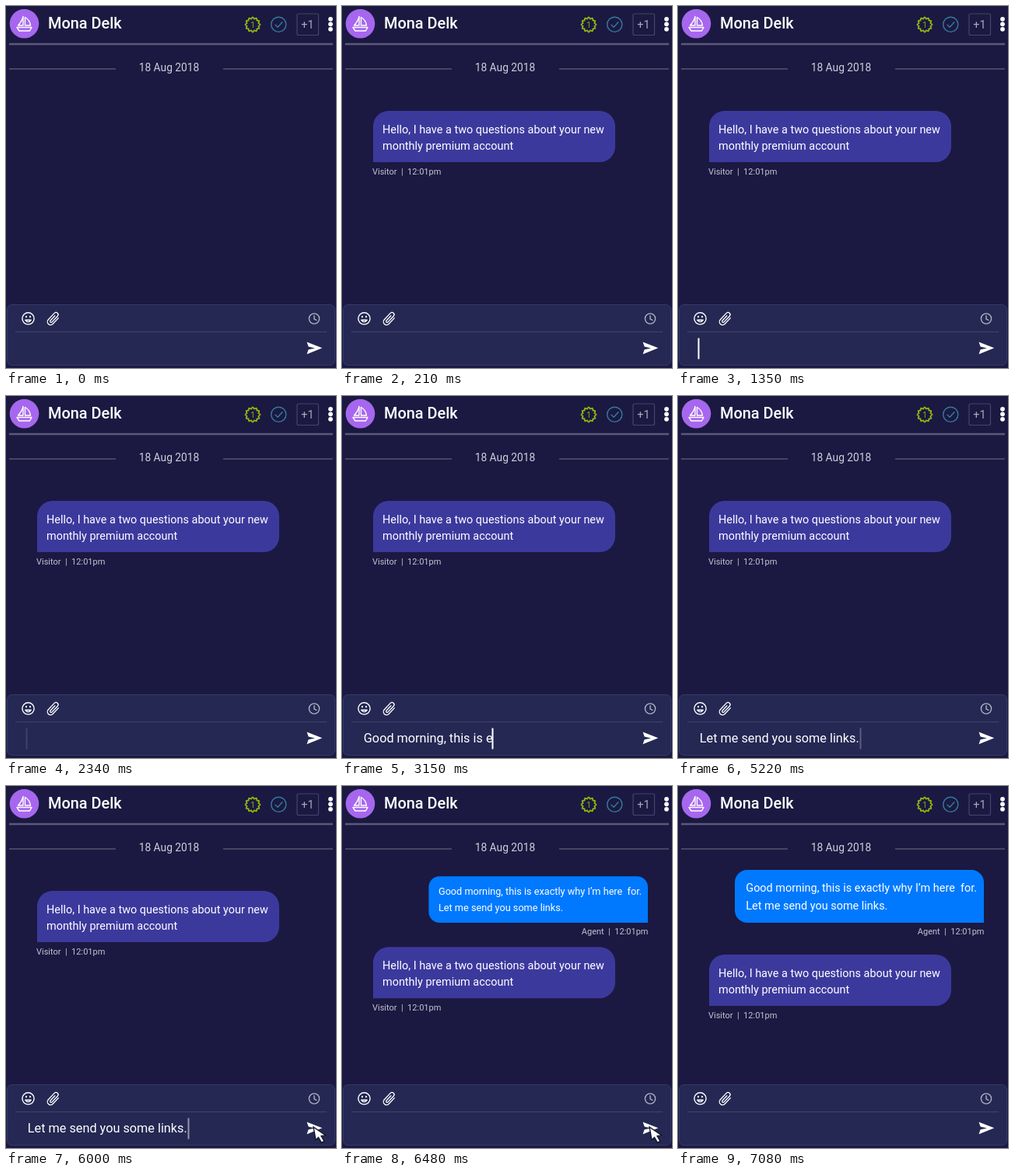
An HTML page for the animation above (8.28 s loop, 424 by 466 pixels).

```html
<!DOCTYPE html>
<html lang="en">
<head>
<meta charset="utf-8">
<title>Chat reply</title>
<style>
  html, body { margin: 0; width: 100%; height: 100%; overflow: hidden; background: #1b1941; }
  svg { display: block; width: 424px; height: 466px; }
  text { font-family: Roboto, Arial, sans-serif; white-space: pre; fill: #fff; }
  .bubble text { font-size: 14.45px; }
  .label { font-size: 11px; fill: #c3c3d2; }
  .line { fill: none; stroke: #fff; stroke-width: 1.4; stroke-linecap: round; stroke-linejoin: round; }
</style>
</head>
<body>
<svg viewBox="0 0 424 466">
  <rect width="424" height="466" fill="#1b1941"/>

  <!-- header -->
  <circle cx="23.5" cy="22.8" r="18.8" fill="#a667ee"/>
  <g class="line" stroke-width="1.3">
    <path d="M14 27.5H33L30.5 32H17ZM22 13.5V25H15.5Q20.5 20 22 13.5ZM24.5 14.5Q30.5 18 31.5 25H24.5Z"/>
  </g>
  <text x="54" y="29.3" font-size="19.9" font-weight="500">Mona Delk</text>
  <path id="badge" class="line" style="stroke:#92b511;stroke-width:1.8"/>
  <text x="317" y="27.8" font-size="10" text-anchor="middle" style="fill:#92b511">1</text>
  <g class="line" style="stroke:#377a9e">
    <circle cx="350.3" cy="23.8" r="9.6"/>
    <path d="M346 24.2L349.2 27.2L355 20.8"/>
  </g>
  <rect x="374" y="10" width="27.5" height="27.5" rx="2" fill="none" stroke="#45446a" stroke-width="1.2"/>
  <text x="387.5" y="28.8" font-size="14.5" text-anchor="middle" style="fill:#a9a9bd">+1</text>
  <g fill="#fff">
    <circle cx="417" cy="16.8" r="2.9"/>
    <circle cx="417" cy="23.3" r="2.9"/>
    <circle cx="417" cy="29.8" r="2.9"/>
  </g>
  <path d="M4 49H420" stroke="#5b5978" stroke-width="2.4"/>
  <path d="M4 81H141M279 81H420" stroke="#55546f" stroke-width="1.5"/>
  <text x="209.5" y="84.2" font-size="13.8" text-anchor="middle" style="fill:#cfcfdb">18 Aug 2018</text>

  <!-- messages -->
  <g id="visitor">
    <g class="bubble">
      <path d="M40 201V155A20 20 0 0 1 60 135H331A20 20 0 0 1 351 155V181A20 20 0 0 1 331 201Z" fill="#3c399d"/>
      <text x="52" y="163.6">Hello, I have a two questions about your new</text>
      <text x="52" y="185">monthly premium account</text>
    </g>
    <text class="label" x="39" y="217">Visitor  |  12:01pm</text>
  </g>
  <g id="agent">
    <g class="bubble">
      <path d="M393 176H89A16 16 0 0 1 73 160V124A16 16 0 0 1 89 108H377A16 16 0 0 1 393 124Z" fill="#0079ff"/>
      <text x="87.3" y="135.6">Good morning, this is exactly why I’m here  for.</text>
      <text x="87.3" y="158.6">Let me send you some links.</text>
    </g>
    <text class="label" x="393.5" y="191" text-anchor="end">Agent  |  12:01pm</text>
  </g>

  <!-- input panel -->
  <rect x="1.5" y="384.5" width="421" height="78" rx="6" fill="#242853" stroke="#353a69"/>
  <path d="M12 419.5H412" stroke="#40446d"/>
  <g class="line">
    <circle cx="28.5" cy="402.3" r="7.6"/>
    <path d="M24.8 404.2Q28.5 409 32.2 404.2Z"/>
    <path d="M26 399.8V400.2M31 399.8V400.2" stroke-width="2"/>
    <path transform="translate(61 402.5) rotate(43)" stroke-width="1.3"
      d="M4 -5V5.5A4 4 0 0 1 -4 5.5V-6A2.8 2.8 0 0 1 1.6 -6V4.5A1.3 1.3 0 0 1 -1.2 4.5V-4"/>
  </g>
  <g class="line" style="stroke:#b0b1c4">
    <circle cx="396" cy="402.5" r="6.6"/>
    <path d="M396 398.6V402.8L398.8 404.4"/>
  </g>
  <path d="M386.5 432.5L406.3 440.3L386.5 448.3L388.6 442.2L397 440.4L388.6 438.6Z" fill="#fff"/>
  <text id="typed" x="27.8" y="445.6" font-size="16.25"></text>
  <rect id="caret" x="-1" y="427.5" width="2" height="27" fill="#fff"/>
  <path id="pointer" d="M0 0L3 16.6L6.4 13.4L10.4 20.2L13.8 18.2L10 11.5L15.6 10.6Z"
    fill="#fff" stroke="#17152f" stroke-width="1.4"/>
</svg>
<script>
const LOOP = 8280, STEP = 30;
const $ = id => document.getElementById(id);
const visitor = $('visitor'), agent = $('agent'), typed = $('typed'), caret = $('caret'), pointer = $('pointer');

// Tables of [time, value], linear in between; a repeated time is a jump.
const pop = [[0, 0], [150, 1.1], [210, 1]];
const caretX = [[2640, 26.5], [3660, 360.5], [3930, 360.5], [3930, 26.5], [4200, 26.5], [4650, 234.5]];
const caretAlpha = [
  [1350, 0], [1350, 1], [1590, 0], [1740, 0], [1980, 1], [2130, 1], [2370, 0],
  [2670, 0], [2670, 1], [3660, 1], [3720, 0], [4050, 0], [4200, 1],
  [5040, 1], [5280, 0], [5430, 0], [5670, 1], [5880, 1], [6000, .5], [6060, 0]
];
const pointerAlpha = [[5310, 0], [5310, 1], [6750, 1], [7080, 0]];
const pointerTravel = [[5280, 0], [5820, 1]];
const pointerScale = [[6180, 1], [6270, .85], [6360, 1]];
const typedAlpha = [[3900, 1], [4200, 0], [4200, 1]];
const lines = [
  { text: 'Good morning, this is exactly why I’m here for.', from: 2640, to: 3660, end: 4200 },
  { text: 'Let me send you some links.', from: 4200, to: 4650, end: 6270 }
];

function at(table, t) {
  const i = table.findLastIndex(p => p[0] <= t);
  if (i < 0) return table[0][1];
  if (i === table.length - 1) return table[i][1];
  const [t0, a] = table[i], [t1, b] = table[i + 1];
  return a + (b - a) * (t - t0) / (t1 - t0);
}

const ease = k => k * k * (3 - 2 * k);

function typedText(t) {
  const line = lines.find(l => t >= l.from && t < l.end);
  if (!line) return '';
  const k = (t - line.from) / (line.to - line.from);
  return line.text.slice(0, Math.floor(k * line.text.length + .3));
}

function showMessage(group, scale, x, y) {
  group.style.display = scale > 0 ? '' : 'none';
  group.firstElementChild.setAttribute('transform',
    `translate(${x} ${y}) scale(${scale}) translate(${-x} ${-y})`);
}

function draw(t) {
  const reply = at(pop, t - 6360);
  showMessage(visitor, at(pop, t), 40, 201);
  showMessage(agent, reply, 393, 176);
  visitor.setAttribute('transform', `translate(0 ${82 * reply})`);

  typed.textContent = typedText(t);
  typed.setAttribute('opacity', at(typedAlpha, t));
  caret.setAttribute('transform', `translate(${at(caretX, t)} 0)`);
  caret.setAttribute('opacity', at(caretAlpha, t));

  const k = ease(at(pointerTravel, t));
  pointer.setAttribute('transform',
    `translate(${5 + 390 * k} ${394 + 45 * k}) scale(${at(pointerScale, t)})`);
  pointer.setAttribute('opacity', at(pointerAlpha, t));
}

function drawBadge() {
  const points = [];
  for (let i = 0; i < 48; i++) {
    const a = i * Math.PI / 24, r = 8.6 + Math.cos(a * 12) * 1;
    points.push(`${(317 + r * Math.cos(a)).toFixed(2)} ${(24 + r * Math.sin(a)).toFixed(2)}`);
  }
  $('badge').setAttribute('d', `M${points.join('L')}Z`);
}

const start = performance.now();
function tick() {
  const t = (performance.now() - start) % LOOP;
  draw(Math.floor(t / STEP) * STEP);
  requestAnimationFrame(tick);
}

drawBadge();
tick();
</script>
</body>
</html>
```
